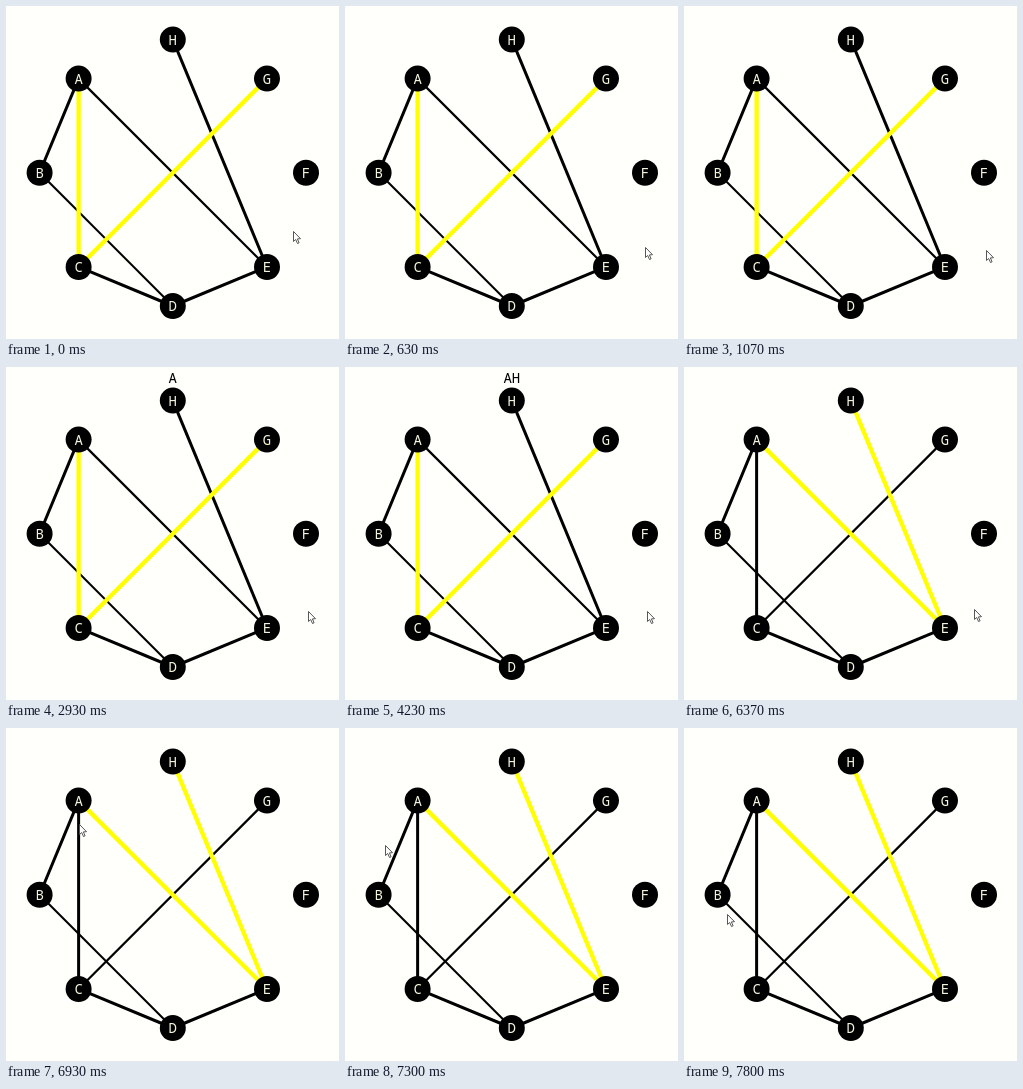
An HTML page with a canvas for the animation above (8000 ms loop, 333 px wide and 333 px high).

```html
<!DOCTYPE html>
<html lang="en">
<head>
<meta charset="utf-8">
<title>Shortest path</title>
<style>
html, body { margin: 0; width: 100%; height: 100%; overflow: hidden; background: #fffffc; }
canvas { display: block; width: 333px; height: 333px; }
</style>
</head>
<body>
<canvas id="stage"></canvas>
<script>
const SIZE = 333, LOOP = 8000, CENTER = 166.8;
const PAPER = '#fffffc', INK = '#000', GLOW = '#ffff00', LABEL = '#f4f4dc';
const GLOW_WIDTH = 4.3;

const canvas = document.getElementById('stage');
const ctx = canvas.getContext('2d');
const dpr = window.devicePixelRatio || 1;
canvas.width = canvas.height = Math.round(SIZE * dpr);
ctx.scale(dpr, dpr);

// Nodes sit evenly on a circle, H at the top, counter-clockwise from there.
const nodes = {};
[...'HABCDEFG'].forEach((name, i) => {
  const a = -Math.PI / 2 - i * Math.PI / 4;
  nodes[name] = { x: CENTER + 133.2 * Math.cos(a), y: CENTER + 133.2 * Math.sin(a) };
});

const edges = { AB: 3, AC: 3, AE: 2.2, BD: 2, CD: 3, CG: 2.2, DE: 3, EH: 3 };
const routes = [
  { from: 0, lit: ['AC', 'CG'] },
  { from: 4730, lit: ['AE', 'EH'] }
];
const typed = [
  { from: 0, text: '' },
  { from: 2000, text: 'A' },
  { from: 4230, text: 'AH' },
  { from: 4730, text: '' }
];

// Pointer keys: time, x, y
const pointer = [
  [30, 287, 225], [830, 302, 244], [6310, 302, 244], [6370, 290, 242],
  [6930, 73, 96], [7170, 41, 109], [7300, 40, 117], [7500, 40, 117],
  [7640, 33, 151], [7800, 43, 186]
];

const current = (list, t) => list.filter(s => s.from <= t).pop();
const smooth = k => k * k * (3 - 2 * k);

function pointerAt(t) {
  const next = pointer.findIndex(p => p[0] > t);
  if (next === 0) return pointer[0].slice(1);
  if (next < 0) return pointer[pointer.length - 1].slice(1);
  const [t0, x0, y0] = pointer[next - 1], [t1, x1, y1] = pointer[next];
  const k = smooth((t - t0) / (t1 - t0));
  return [x0 + (x1 - x0) * k, y0 + (y1 - y0) * k];
}

function drawEdge(key, color, width) {
  const a = nodes[key[0]], b = nodes[key[1]];
  ctx.strokeStyle = color;
  ctx.lineWidth = width;
  ctx.beginPath();
  ctx.moveTo(a.x, a.y);
  ctx.lineTo(b.x, b.y);
  ctx.stroke();
}

function drawText(text, x, y, color) {
  ctx.fillStyle = color;
  ctx.fillText(text, x, y + 5);
}

function drawNode(name) {
  const { x, y } = nodes[name];
  ctx.fillStyle = INK;
  ctx.beginPath();
  ctx.arc(x, y, 13, 0, Math.PI * 2);
  ctx.fill();
  drawText(name, x, y, LABEL);
}

function drawPointer([x, y]) {
  ctx.save();
  ctx.translate(Math.round(x) + 0.5, Math.round(y) + 0.5);
  ctx.beginPath();
  [[0, 0], [0, 10], [2.2, 8], [4, 12], [5.6, 11.3], [3.9, 7.4], [7, 7.2]]
    .forEach(([px, py]) => ctx.lineTo(px, py));
  ctx.closePath();
  ctx.fillStyle = '#fff';
  ctx.fill();
  ctx.strokeStyle = '#444';
  ctx.lineWidth = 0.9;
  ctx.stroke();
  ctx.restore();
}

function draw(t) {
  ctx.fillStyle = PAPER;
  ctx.fillRect(0, 0, SIZE, SIZE);
  ctx.font = '300 14px "Noto Sans Mono", "DejaVu Sans Mono", monospace';
  ctx.textAlign = 'center';
  ctx.textBaseline = 'alphabetic';

  const { lit } = current(routes, t);
  for (const key in edges) if (!lit.includes(key)) drawEdge(key, INK, edges[key]);
  for (const key of lit) drawEdge(key, GLOW, GLOW_WIDTH);
  Object.keys(nodes).forEach(drawNode);
  drawText(current(typed, t).text, CENTER, 11, INK);
  drawPointer(pointerAt(t));
}

const start = performance.now();
function tick() {
  draw((performance.now() - start) % LOOP);
  requestAnimationFrame(tick);
}
tick();
</script>
</body>
</html>
```
